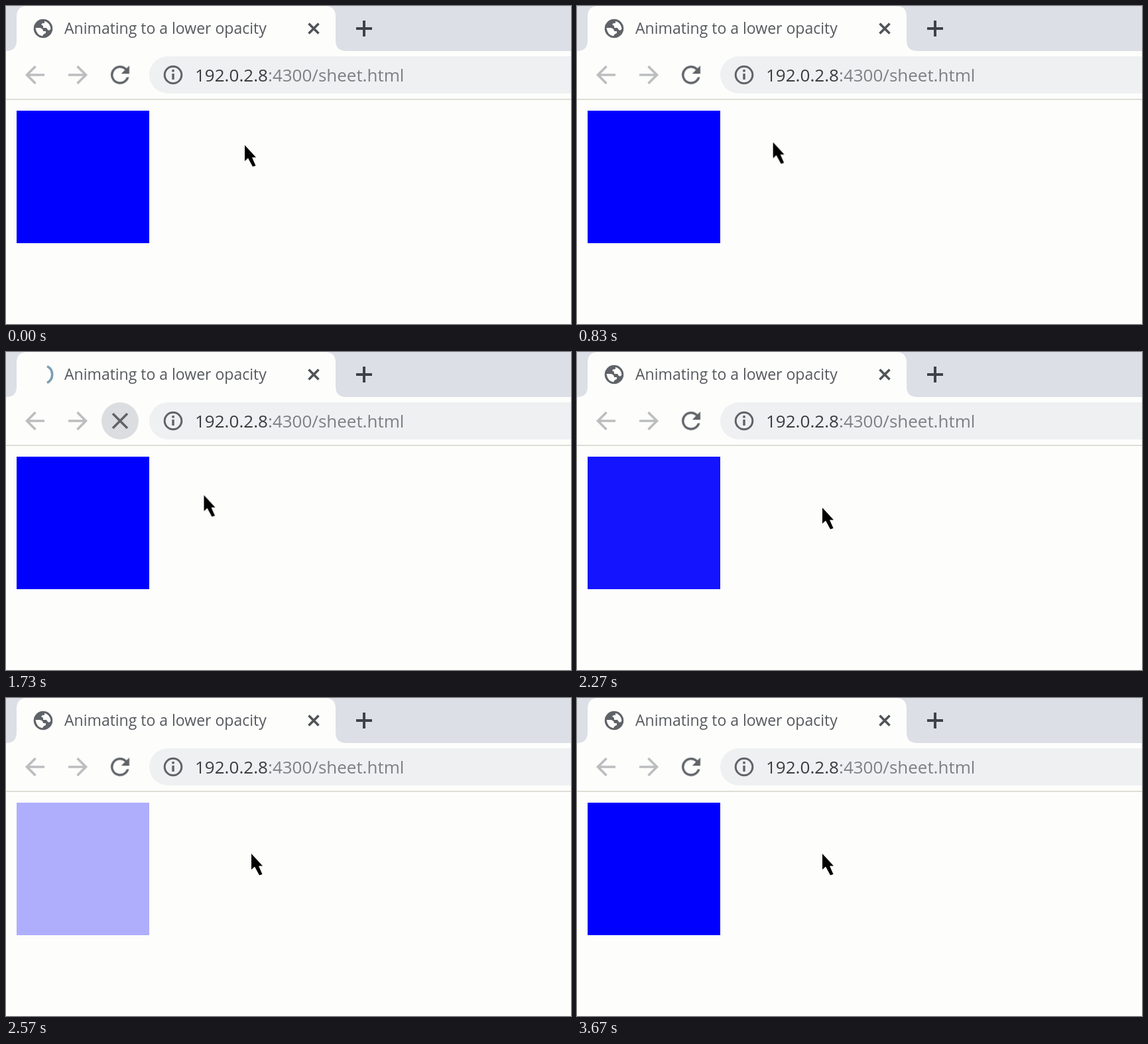
Animation, 852 px wide and 480 px high, one loop 3810 ms. Source, as an HTML page:

```html
<!DOCTYPE html>
<html lang="en">
<head>
<meta charset="utf-8">
<title>Opacity animation</title>
<style>
  html, body { margin: 0; width: 100%; height: 100%; overflow: hidden; background: #fdfdfc; }
  svg { display: block; width: 100%; height: 100%; }
  text { font-family: "Open Sans", "Noto Sans", sans-serif; white-space: pre; }
  .paper { fill: #fdfdfc; }
  .line { fill: none; stroke: #5f6368; stroke-width: 3.6; }
  .faded { stroke: #bcbdbf; }
  .icon { fill: #5f6368; }
</style>
</head>
<body>
<svg viewBox="0 0 852 480">
  <rect class="paper" width="852" height="480"/>

  <!-- tab strip -->
  <rect width="852" height="68" fill="#dcdfe5"/>
  <path class="paper" d="M0 68Q16 68 16 52V16Q16 0 32 0H481Q497 0 497 16V52Q497 68 513 68Z"/>
  <g transform="translate(56 34)">
    <g id="globe">
      <circle class="icon" r="14.300"/>
      <path class="paper" d="M-11.500 -1H-5Q0 0 0 4H4V7Q0 8 -1 11.500Q-10 10 -11.500 -1ZM2 -11.300Q10 -9 11.500 0Q10 4 7 2L5 -1H0V-4L-3 -6Q-1 -9 2 -8Z"/>
    </g>
    <g id="spinner"><path class="line" style="stroke:#7d9fb2" d="M6 -12.500A14 14 0 0 1 6 12.500"/></g>
  </g>
  <text x="88" y="42" font-size="23" fill="#55585c">Animating to a lower opacity</text>
  <path class="line" style="stroke:#505357" d="M456.500 26.500l15 15m0-15l-15 15"/>
  <path class="line" style="stroke:#3f4246;stroke-width:4" d="M528 34h24m-12-12v24"/>

  <!-- toolbar -->
  <path class="line faded" d="M58 104H32M44.500 91L31.500 104L44.500 117"/>
  <path class="line faded" d="M94 104H120M107.500 91L120.500 104L107.500 117"/>
  <g transform="translate(172 104)">
    <circle id="hover" r="28" fill="#dcdde0"/>
    <path id="reload" class="icon" transform="scale(1.75) translate(-12 -12)" d="M17.650 6.350C16.200 4.900 14.210 4 12 4a8 8 0 1 0 7.730 10h-2.080A6 6 0 1 1 16.220 7.780L13 11h7V4z"/>
    <path id="stop" class="line" d="M-11 -11L11 11M11 -11L-11 11"/>
  </g>
  <rect x="216" y="76" width="680" height="56" rx="28" fill="#eef0f1"/>
  <circle class="line" style="stroke-width:3" cx="252" cy="104" r="12.800"/>
  <path class="icon" d="M250.300 96h3.400v3.400h-3.400zM250.300 102h3.400v9h-3.400z"/>
  <text x="285" y="114" font-size="26" fill="#7d8084"><tspan fill="#3a3c40">192.0.2.8</tspan>:4300/sheet.html</text>
  <rect y="140" width="852" height="2" fill="#deded6"/>

  <!-- page -->
  <rect id="box" x="16" y="158" width="200" height="200" fill="#00f"/>
  <path id="cursor" d="M0 0V24L5 19.500L12 32.500L16.500 31L11 18.500H17Z" stroke="#fdfdfc" stroke-width="2" paint-order="stroke"/>
</svg>
<script>
  const LOOP = 3810;

  // steps: [time in ms, value, easing towards the next step]
  function loop(id, property, steps) {
    const frames = steps.map(([time, value, easing = "linear"]) =>
      ({ offset: time / LOOP, [property]: value, easing }));
    frames.push({ ...frames[frames.length - 1], offset: 1 });
    document.getElementById(id).animate(frames, { duration: LOOP, iterations: Infinity });
  }

  function showBetween(id, start, end, inside = 1) {
    const outside = 1 - inside;
    loop(id, "opacity", [
      [0, outside, "step-end"], [start, inside, "step-end"], [end, outside, "step-end"]
    ]);
  }

  const at = (x, y) => `translate(${x}px, ${y}px)`;
  loop("cursor", "transform", [
    [0, at(360, 210)],
    [700, at(360, 210), "ease-in"],
    [830, at(296, 206)],
    [1130, at(182, 112), "ease-out"],
    [1220, at(174, 106)],
    [1560, at(174, 106), "ease-in"],
    [1730, at(298, 216), "ease-out"],
    [2000, at(370, 235)]
  ]);

  const load = { start: 1480, end: 1960 };
  showBetween("hover", 1120, 1800);
  showBetween("stop", load.start, load.end);
  showBetween("reload", load.start, load.end, 0);
  showBetween("globe", load.start, load.end, 0);
  showBetween("spinner", load.start, load.end);

  const turn = time => `rotate(${(time - 1730) * 360 / 1568}deg)`;
  document.getElementById("spinner").animate(
    { transform: [turn(0), turn(LOOP)] },
    { duration: LOOP, iterations: Infinity }
  );

  loop("box", "opacity", [
    [0, 1], [2205, 1, "ease"], [2855, 0.2, "step-end"], [2855, 1]
  ]);
</script>
</body>
</html>
```
